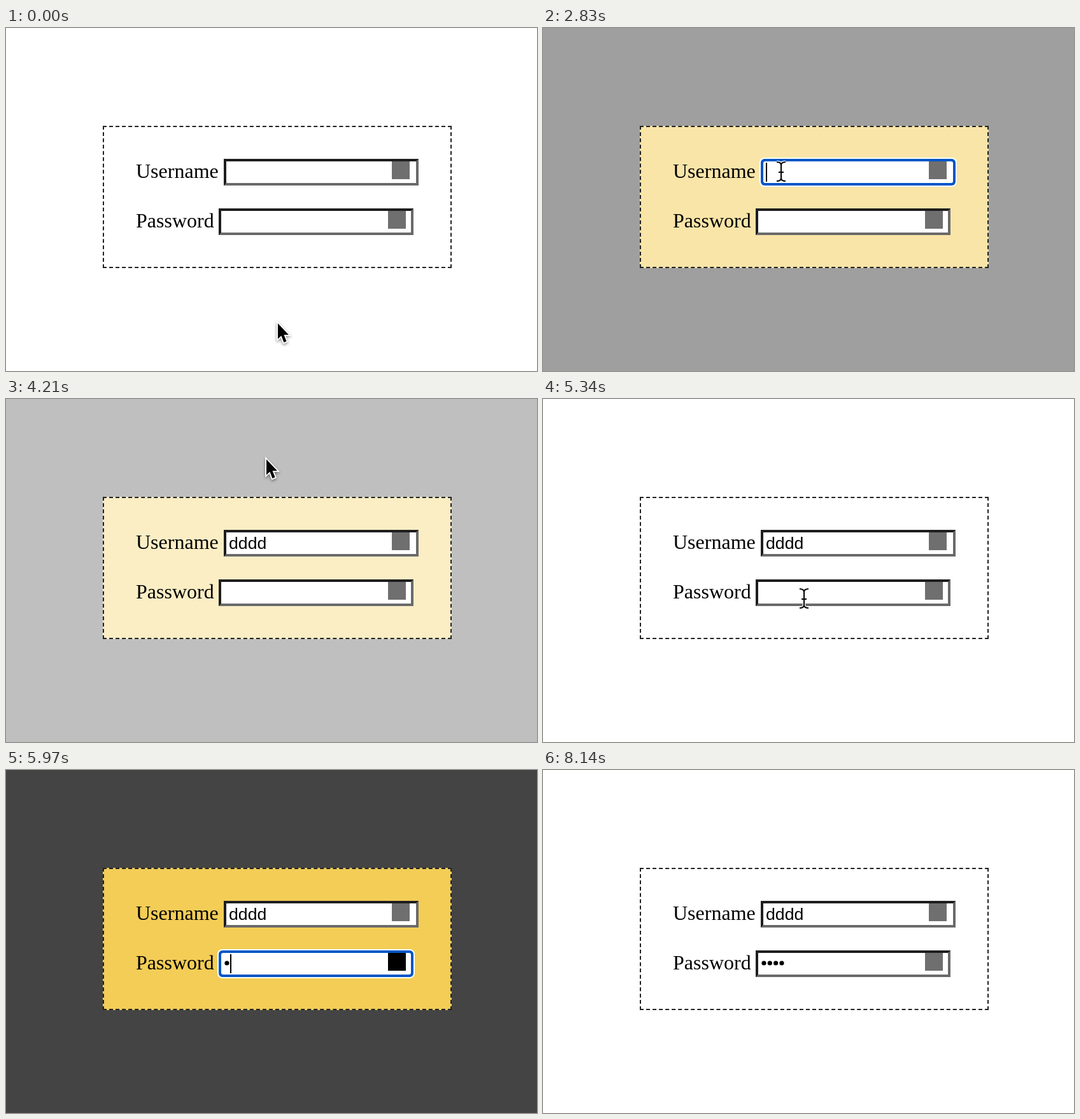
Recreate the animation shown at these times as an HTML page with a canvas. Size 834x540 px, loop 8.96 s.

```html
<!DOCTYPE html>
<html lang="en">
<head>
<meta charset="utf-8">
<title>Login form focus</title>
<style>
  html, body { margin: 0; width: 100%; height: 100%; overflow: hidden; background: #fff; }
  canvas { display: block; }
</style>
</head>
<body>
<canvas id="stage" width="834" height="540"></canvas>
<script>
const ctx = document.getElementById('stage').getContext('2d');
const LOOP = 8960, FADE = 300;
const DIM = 0.733, GOLD = [243, 205, 86];
const CARD = { x: 152, y: 154, w: 548, h: 224 };

const FIELDS = [
  { label: 'Username', x: 342, y: 206, icon: 606, textX: 350, advance: 14.83,
    focus: 2741, blur: 4096, keys: [3100, 3260, 3420, 3580], masked: false },
  { label: 'Password', x: 334, y: 284, icon: 600, textX: 342.3, advance: 9.33,
    focus: 5620, blur: 7485, keys: [5965, 6150, 6305, 6475], masked: true }
];
const FIELD_W = 306, FIELD_H = 42;

// Pointer stops: time, x, y
const POINTER = [
  [0, 427, 465], [500, 427, 465], [760, 406, 197], [880, 406, 197],
  [1070, 397, 238], [1239, 397, 238], [1240, 402, 238], [2530, 402, 238],
  [2690, 374, 226], [3660, 374, 226], [3960, 409, 95], [4760, 409, 95],
  [5290, 410, 314], [6670, 410, 314], [7170, 403, 467], [7970, 403, 467],
  [8140, 850, 137]
];
const POINTER_HIDDEN = [[3100, 3660], [5965, 6670], [8140, LOOP]];

const within = (v, a, b) => v >= a && v < b;
const clamp01 = v => Math.min(1, Math.max(0, v));
const smooth = v => v * v * (3 - 2 * v);

// CSS "ease": cubic-bezier(.25, .1, .25, 1)
function ease(p) {
  if (p <= 0 || p >= 1) return clamp01(p);
  const bez = (a, b, s) => 3 * a * s * (1 - s) ** 2 + 3 * b * s * s * (1 - s) + s ** 3;
  let lo = 0, hi = 1;
  for (let i = 0; i < 24; i++) {
    const mid = (lo + hi) / 2;
    if (bez(0.25, 0.25, mid) < p) lo = mid; else hi = mid;
  }
  return bez(0.1, 1, lo);
}

function dimAt(t) {
  return FIELDS.reduce((sum, f) =>
    sum + ease((t - f.focus) / FADE) - ease((t - f.blur) / FADE), 0);
}

function fillRound(x, y, w, h, r, color) {
  ctx.fillStyle = color;
  ctx.beginPath();
  ctx.roundRect(x, y, w, h, r);
  ctx.fill();
}

function polygon(points) {
  ctx.beginPath();
  points.forEach(([x, y]) => ctx.lineTo(x, y));
  ctx.closePath();
}

// Whole dashes at both ends, with the gap stretched to fit
function dashedLine(x, y, length, vertical) {
  const dash = 6, gap = 4;
  const fit = n => (length - n * dash) / (n - 1);
  const few = Math.floor((length + gap) / (dash + gap));
  const best = Math.abs(fit(few) - gap) < Math.abs(fit(few + 1) - gap) ? few : few + 1;
  ctx.setLineDash([dash, fit(best)]);
  ctx.beginPath();
  ctx.moveTo(x, y);
  ctx.lineTo(vertical ? x : x + length, vertical ? y + length : y);
  ctx.stroke();
  ctx.setLineDash([]);
}

function drawCard(dim) {
  const { x, y, w, h } = CARD;
  ctx.fillStyle = `rgb(${GOLD.map(c => Math.round(255 - (255 - c) * dim))})`;
  ctx.fillRect(x, y, w, h);
  ctx.strokeStyle = '#222';
  ctx.lineWidth = 2;
  dashedLine(x, y + 1, w, false);
  dashedLine(x, y + h - 1, w, false);
  dashedLine(x + 1, y, h, true);
  dashedLine(x + w - 1, y, h, true);
}

function drawInset(x, y, w, h) {
  const b = 4;
  ctx.fillStyle = '#6a6a6a';
  ctx.fillRect(x, y, w, h);
  ctx.fillStyle = '#1e1e1e';
  polygon([[x, y], [x + w, y], [x + w - b, y + b], [x + b, y + b],
           [x + b, y + h - b], [x, y + h]]);
  ctx.fill();
  ctx.fillStyle = '#fff';
  ctx.fillRect(x + b, y + b, w - 2 * b, h - 2 * b);
}

function drawFocused(x, y, w, h) {
  fillRound(x - 2, y - 2, w + 4, h + 4, 8, '#fff');
  fillRound(x, y, w, h, 6, '#0056c7');
  fillRound(x + 4, y + 4, w - 8, h - 8, 3, '#fff');
}

function drawField(f, t) {
  const focused = within(t, f.focus, f.blur);
  const baseline = f.y + 30;
  ctx.fillStyle = '#000';
  ctx.font = '32px "Liberation Serif", Times, serif';
  ctx.fillText(f.label, 204, baseline);

  (focused ? drawFocused : drawInset)(f.x, f.y, FIELD_W, FIELD_H);

  ctx.fillStyle = focused && t > f.focus + 130 ? '#000' : '#6f6f6f';
  ctx.fillRect(f.icon, f.y + 4, 28, 28);

  ctx.fillStyle = '#000';
  const typed = f.keys.filter(k => t >= k).length;
  if (f.masked) {
    for (let i = 0; i < typed; i++) {
      ctx.beginPath();
      ctx.arc(f.textX + (i + 0.5) * f.advance, f.y + 20, 3.6, 0, 7);
      ctx.fill();
    }
  } else {
    ctx.font = '26.667px "Liberation Sans", Arial, sans-serif';
    ctx.fillText('d'.repeat(typed), f.textX, baseline);
  }

  const lastInput = typed ? f.keys[typed - 1] : f.focus;
  if (focused && (t - lastInput) % 1000 < 500) {
    ctx.fillRect(Math.round(f.textX + typed * f.advance), f.y + 6, 2, 30);
  }
}

function pointerAt(t) {
  const i = POINTER.findIndex(p => p[0] > t);
  if (i < 0) return POINTER[POINTER.length - 1].slice(1);
  const [t0, x0, y0] = POINTER[i - 1], [t1, x1, y1] = POINTER[i];
  const k = smooth((t - t0) / (t1 - t0));
  return [x0 + (x1 - x0) * k, y0 + (y1 - y0) * k];
}

function drawArrow() {
  polygon([[0, 0], [0, 24.5], [5.4, 19.6], [9.4, 30], [13.6, 28.2], [9.5, 18], [17, 18]]);
  ctx.lineJoin = 'miter';
  ctx.lineWidth = 3.6;
  ctx.strokeStyle = '#fff';
  ctx.save();
  ctx.shadowColor = 'rgba(0,0,0,.45)';
  ctx.shadowBlur = 4;
  ctx.shadowOffsetY = 2;
  ctx.stroke();
  ctx.restore();
  ctx.fillStyle = '#000';
  ctx.fill();
}

function drawIBeam() {
  ctx.beginPath();
  for (const side of [-1, 1]) {
    ctx.moveTo(side * 7, -15);
    ctx.quadraticCurveTo(0, -15, 0, -10);
    ctx.lineTo(0, 10);
    ctx.quadraticCurveTo(0, 15, side * 7, 15);
  }
  ctx.moveTo(-4, 1);
  ctx.lineTo(4, 1);
  ctx.lineJoin = 'round';
  for (const [width, color] of [[4.5, '#fff'], [2, '#000']]) {
    ctx.lineWidth = width;
    ctx.strokeStyle = color;
    ctx.stroke();
  }
}

function drawPointer(t) {
  if (POINTER_HIDDEN.some(([a, b]) => within(t, a, b))) return;
  const [x, y] = pointerAt(t);
  const overField = FIELDS.some(f =>
    within(x, f.x, f.x + FIELD_W) && within(y, f.y, f.y + FIELD_H));
  ctx.save();
  ctx.translate(x, y);
  (overField ? drawIBeam : drawArrow)();
  ctx.restore();
}

function draw(t) {
  const dim = dimAt(t);
  const shade = Math.round(255 * (1 - DIM * dim));
  ctx.fillStyle = `rgb(${shade},${shade},${shade})`;
  ctx.fillRect(0, 0, 834, 540);
  drawCard(dim);
  FIELDS.forEach(f => drawField(f, t));
  drawPointer(t);
}

const start = performance.now();
function tick() {
  draw((performance.now() - start) % LOOP);
  requestAnimationFrame(tick);
}
tick();
</script>
</body>
</html>
```
